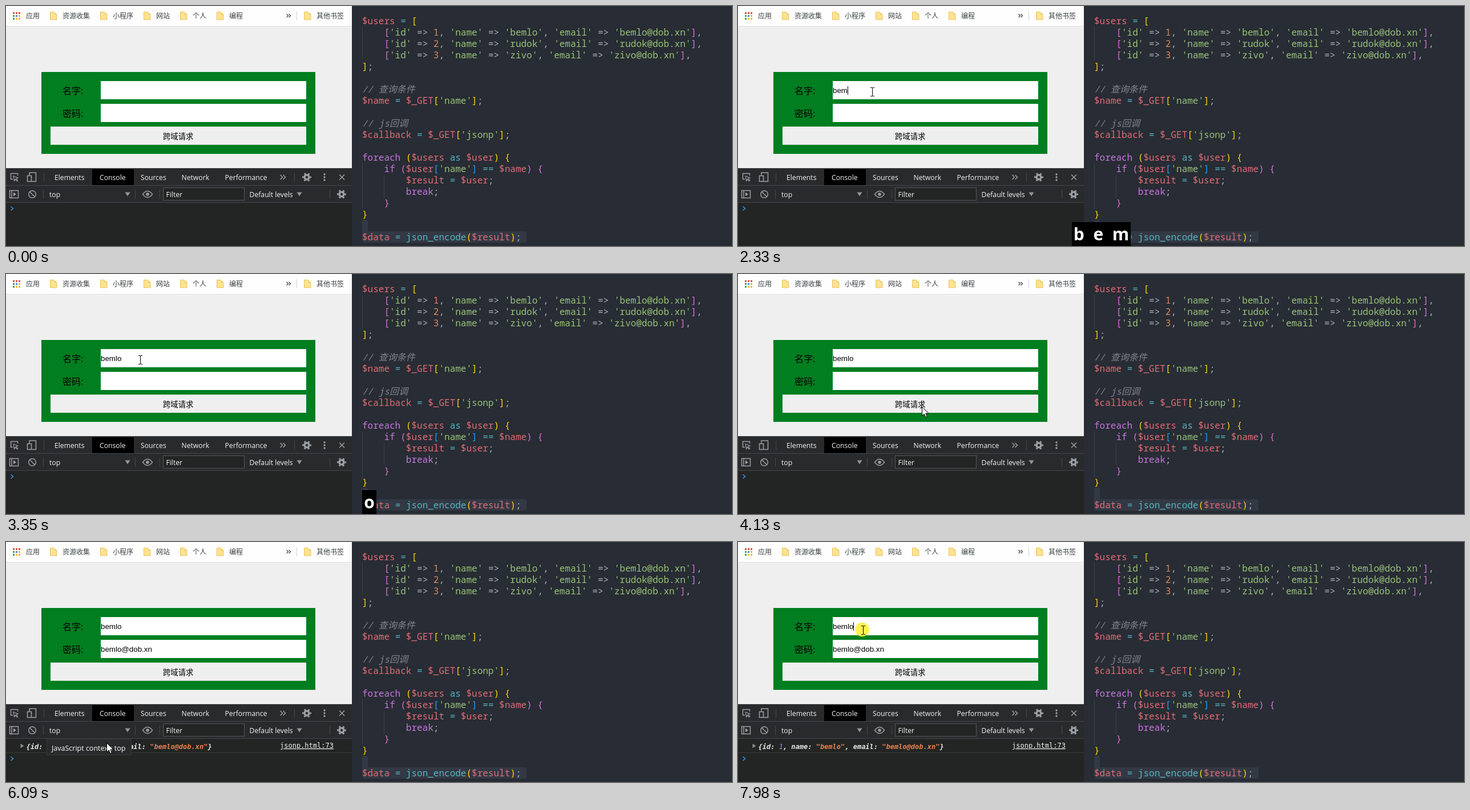
Animation, 1272 px wide and 422 px high, one loop 8000 ms. Source, as an HTML page:

```html
<!DOCTYPE html>
<html lang="zh-CN">
<head>
<meta charset="utf-8">
<title>JSONP</title>
<style>
html, body { margin: 0; width: 100%; height: 100%; overflow: hidden; background: #282c34; }
svg { display: block; }
text { white-space: pre; }
.cjk { font-family: "Noto Sans CJK SC", "Noto Sans CJK", sans-serif; }
.bar { font-size: 12px; fill: #3c4043; }
.form { font-size: 16px; fill: #000; }
.field { font: 13.333px "Liberation Sans", Arial, sans-serif; fill: #000; }
.ui { font: 12.2px "Open Sans", sans-serif; fill: #f4f4f4; }
.tip { font: 12.5px "Open Sans", sans-serif; fill: #fff; }
.log { font: italic bold 12px "DejaVu Sans Mono", monospace; fill: #e8e8e8; }
.link { font: 12px "DejaVu Sans Mono", monospace; fill: #f4f4f4; text-decoration: underline; }
.code { font: 16px "Noto Sans Mono", "Noto Sans CJK SC", monospace; fill: #abb2bf; }
.keys { font: bold 30px "Open Sans", sans-serif; fill: #fff; text-anchor: middle; }
.icon { fill: none; stroke: #9aa0a6; stroke-width: 1.5; }
</style>
</head>
<body>
<svg id="stage" width="1272" height="422" viewBox="0 0 1272 422"></svg>
<script>
const LOOP = 8000;
const USER = 'bemlo', MAIL = USER + '@dob.xn';
const stage = document.getElementById('stage');

function el(tag, attrs, parent = stage, content) {
  const node = document.createElementNS('http://www.w3.org/2000/svg', tag);
  for (const k in attrs) node.setAttribute(k, attrs[k]);
  if (content !== undefined) node.textContent = content;
  parent.appendChild(node);
  return node;
}
const rect = (x, y, width, height, fill, parent, more) =>
  el('rect', { x, y, width, height, fill, ...more }, parent);
const label = (cls, x, y, str, parent, more) =>
  el('text', { class: cls, x, y, ...more }, parent, str);
const icon = (d, more) => el('path', { class: 'icon', d, ...more });
const show = (node, on) => node.setAttribute('visibility', on ? 'visible' : 'hidden');

// Bookmarks bar
function folder(x) {
  el('path', { d: `M${x + .5} 10.5h7l1 2v2h3.5v9.5h-11.5z`, fill: '#ffe391', stroke: '#e8c258' });
  rect(x + 8, 13, 3, 1, '#e8c258');
}
function bookmarks() {
  rect(0, 0, 606, 36, '#fefefe');
  rect(0, 35, 606, 1, '#e2e2e2');
  const dots = ['#e04a3f', '#e04a3f', '#e04a3f', '#3a9d57', '#4285f4', '#f2b50f', '#3a9d57', '#f2b50f', '#f2b50f'];
  dots.forEach((c, i) => rect(12 + i % 3 * 5, 11 + Math.floor(i / 3) * 5, 3, 3, c));
  label('cjk bar', 35, 21.5, '应用');
  [[77, '资源收集'], [165, '小程序'], [241, '网站'], [305, '个人'], [369, '编程'], [522, '其他书签']]
    .forEach(([x, name]) => { folder(x); label('cjk bar', x + 22, 21.5, name); });
  icon('M491.5 14l3 3-3 3M495.5 14l3 3-3 3', { style: 'stroke:#55595e' });
  rect(509, 9, 1, 16, '#d5d7da');
}

function page() {
  rect(0, 36, 606, 249, '#efefef');
  rect(62, 116, 480, 144, '#007e20');
  rect(166, 132, 360, 32, '#fff');
  rect(166, 172, 360, 32, '#fff');
  rect(78, 212, 448, 32, '#efefef');
  label('cjk form', 99, 155, '名字:');
  label('cjk form', 99, 195, '密码:');
  label('cjk', 301.7, 234, '跨域请求', stage, { 'font-size': 13.333, 'text-anchor': 'middle' });
}

// Developer tools
function gear(x, y) {
  el('circle', { class: 'icon', cx: x, cy: y, r: 4, style: 'stroke-width:3.6' });
  el('circle', { class: 'icon', cx: x, cy: y, r: 6.7, style: 'stroke-width:2.6',
    'stroke-dasharray': '3 4.016', 'stroke-dashoffset': 1.5 });
}
function tools() {
  rect(0, 285, 606, 137, '#232424');
  rect(0, 285, 606, 61, '#292a2b');
  rect(0, 285, 606, 1, '#45474a');
  rect(0, 315, 606, 1, '#45474a');
  rect(0, 345, 606, 1, '#45474a');
  rect(151, 287, 73, 28, '#000');
  [[85, 'Elements'], [164, 'Console'], [236, 'Sources'], [307.5, 'Network'], [383.5, 'Performance']]
    .forEach(([x, name]) => label('ui', x, 305.5, name));
  icon('M12 304.5H8.5V294.5H20.5V298');
  icon('M13 299l8 3-3.3 1.5 3 3.5-1.5 1-3-3.5-1.7 3z', { style: 'stroke-width:1.2' });
  icon('M41 298V293H52.5V308.5H45M37.5 298.5h7v10h-7z');
  icon('M480.5 297l4 4-4 4M485.5 297l4 4-4 4');
  gear(527, 301);
  [296, 301, 306].forEach(cy => el('circle', { cx: 558, cy, r: 1.7, fill: '#9aa0a6' }));
  icon('M584 296.5l9 9M593 296.5l-9 9');
  icon('M6.5 324.5h15v13h-15zM10 324.5v13');
  el('path', { d: 'M13 327.5l5 3.5-5 3.5z', fill: '#9aa0a6' });
  icon('M41.5 326.5l9 9M52.3 331a6.3 6.3 0 1 1-12.6 0a6.3 6.3 0 1 1 12.6 0z');
  label('ui', 76, 335.5, 'top');
  label('ui', 426.5, 335.5, 'Default levels');
  [[213, 331], [514, 331]].forEach(([x, y]) =>
    el('path', { d: `M${x - 4.5} ${y - 3.5}h9l-4.5 7z`, fill: '#8f9499' }));
  icon('M239.5 331q8.5-11 17 0q-8.5 11-17 0z');
  el('circle', { cx: 248, cy: 331, r: 2.8, fill: '#9aa0a6' });
  [[66, 293], [505, 293], [65, 323], [226, 323], [269, 323], [567, 323]]
    .forEach(([x, y]) => rect(x, y, 1, 16, '#45474a'));
  rect(275.5, 319.5, 142, 22, '#232424', stage, { stroke: '#55585b' });
  label('ui', 280.5, 336, 'Filter');
  gear(588, 331);
}

// Editor: colours follow token kind, brackets follow nesting depth
const RED = '#e06c75', CYAN = '#56b6c2', GREEN = '#98c379', PURPLE = '#c678dd';
const BRACKETS = ['#ffd700', '#da70d6', '#179fff'];
const row = (id, name) => `    ['id' => ${id}, 'name' => '${name}', 'email' => '${name}@dob.xn'],`;
const CODE = [
  '$users = [', row(1, USER), row(2, 'rudok'), row(3, 'zivo'), '];', '',
  '// 查询条件', "$name = $_GET['name'];", '',
  '// js回调', "$callback = $_GET['jsonp'];", '',
  'foreach ($users as $user) {',
  "    if ($user['name'] == $name) {",
  '        $result = $user;', '        break;', '    }', '}', '',
  '$data = json_encode($result);'
];
function editor() {
  rect(606, 0, 666, 422, '#282c34');
  rect(624, 376, 10, 24, '#323944', stage, { rx: 3 });
  rect(624, 396, 288, 20, '#323944', stage, { rx: 3 });
  [[624, 37, 60], [624, 277, 80], [662, 297, 40]].forEach(([x, y, h]) => rect(x, y, 1, h, '#3b4048'));
  let depth = 0;
  const colour = s => {
    if (/^[\[({]$/.test(s)) return BRACKETS[depth++ % 3];
    if (/^[\])}]$/.test(s)) return BRACKETS[--depth % 3];
    if (s[0] === '$') return RED;
    if (s[0] === "'") return GREEN;
    if (/^\d/.test(s)) return '#d9895f';
    if (/^(foreach|if|break)$/.test(s)) return PURPLE;
    if (/^(as|json_encode|==?)$/.test(s)) return CYAN;
    return '#abb2bf';
  };
  CODE.forEach((line, i) => {
    const text = label('code', 624, 32 + 20 * i, '');
    if (line.startsWith('//')) {
      el('tspan', { fill: '#7f848e', 'font-style': 'italic' }, text, line);
      return;
    }
    for (const s of line.match(/\$\w+|'[^']*'|\w+|=>|==|\s+|./g) || [])
      el('tspan', { fill: colour(s) }, text, s);
  });
}

bookmarks();
page();
tools();
editor();

// Changing parts
const nameText = label('field', 166, 153, '');
const mailText = label('field', 166, 193, MAIL);
const caret = rect(166, 141, 1, 15, '#000');

const log = el('g', {});
el('path', { d: 'M25.5 354.5l6 4-6 4z', fill: '#85898d' }, log);
const entry = label('log', 35.5, 363.5, '', log);
[['{id: '], ['1', '#9a8fd0', 'normal'], [', name: '], [`"${USER}"`, '#e8834f'],
 [', email: '], [`"${MAIL}"`, '#e8834f'], ['}']]
  .forEach(([s, fill = '#e8e8e8', weight = 'bold']) =>
    el('tspan', { fill, 'font-weight': weight }, entry, s));
label('link', 480, 362, 'jsonp.html:73', log);
rect(0, 370, 606, 1, '#3a3b3c', log);
const prompt = el('path', { d: 'M8.5 352.5l4 3.5-4 3.5', fill: 'none', stroke: '#3b93e0', 'stroke-width': 1.6 });

const tip = el('g', {});
rect(71.5, 347.5, 148, 27, '#292a2b', tip, { stroke: '#37393b' });
label('tip', 80, 366.5, 'JavaScript context: top', tip);

const keyBox = rect(0, 380, 0, 42, '#000');
const keyText = label('keys', 636.5, 412, '');

const halo = el('circle', { cx: 0, cy: 0, r: 12.5, fill: '#ffee2e', opacity: .82 });
const arrow = el('path', { d: 'M.5 .5v16l3.7-3.5 2.5 5.6 2.6-1.1-2.5-5.5h5.2z', fill: '#fff', stroke: '#000' });
const beam = el('path', { d: 'M-3.5 -7.5h3l.5 .5 .5-.5h3M0 -7v14M-3.5 7.5h3l.5-.5 .5 .5h3', fill: 'none' });

// Key strokes: time shown, time gone
const KEYS = [[2010, 2940], [2160, 3110], [2330, 3260], [2410, 3350], [2480, 3440]];
const CARET = [[1090, 1630], [2010, 3010], [3530, 4130], [7980, 8000]];
const CLICKS = [[1090, 1170], [4590, 4660], [7980, 8000]];
const RESULT = 4660;

// Pointer moves: first step, last step, step count, path
const MOVES = [
  [70, 840, 11, [[697, 374], [470, 335], [300, 288], [225, 243], [192, 180], [233, 153]]],
  [920, 920, 1, [[233, 153], [235, 151]]],
  [3510, 3730, 4, [[235, 151], [282, 195], [322, 233]]],
  [4360, 4360, 1, [[322, 233], [320, 233]]],
  [5750, 6500, 10, [[320, 233], [255, 288], [176, 353], [95, 371], [29, 366]]],
  [6570, 6640, 2, [[29, 366], [24, 363]]],
  [6820, 7580, 11, [[24, 363], [60, 368], [160, 340], [260, 282], [316, 236], [287, 196], [250, 167]]],
  [7650, 7760, 2, [[250, 167], [239, 154]]],
  [7900, 7980, 2, [[239, 154], [219, 155]]]
];

const within = (spans, t) => spans.some(([a, b]) => t >= a && t < b);

function along(path, u) {
  const p = u * (path.length - 1), i = Math.min(Math.floor(p), path.length - 2);
  return [0, 1].map(k => path[i][k] + (path[i + 1][k] - path[i][k]) * (p - i));
}
function pointer(t) {
  const move = MOVES.filter(m => t >= m[0]).pop();
  if (!move) return null;
  const [from, to, n, path] = move;
  const gap = n > 1 ? (to - from) / (n - 1) : 1;
  const step = Math.min(n - 1, Math.floor((t - from) / gap + 1e-6));
  return along(path, (step + 1) / n).map(Math.round);
}
function overText(x, y) {
  const inField = x >= 166 && x < 526 && ((y >= 132 && y < 164) || (y >= 172 && y < 204));
  return inField || x > 606;
}

function draw(t) {
  nameText.textContent = USER.slice(0, KEYS.filter(k => t >= k[0]).length);
  caret.setAttribute('x', 166 + Math.round(nameText.getComputedTextLength()));
  show(caret, within(CARET, t));

  const done = t >= RESULT;
  show(mailText, done);
  show(log, done);
  prompt.setAttribute('transform', `translate(0 ${done ? 25 : 0})`);
  show(tip, t >= 6000 && t < 6250);

  const held = [...USER].filter((c, i) => within([KEYS[i]], t)).join('  ');
  keyText.textContent = held;
  const width = held ? Math.round(keyText.getComputedTextLength()) + 6 : 0;
  keyBox.setAttribute('width', width);
  keyBox.setAttribute('x', 636.5 - width / 2);

  const at = pointer(t);
  const text = at && overText(...at);
  show(arrow, at && !text);
  show(beam, text);
  show(halo, at && within(CLICKS, t));
  if (!at) return;
  const [x, y] = at;
  arrow.setAttribute('transform', `translate(${x} ${y})`);
  beam.setAttribute('transform', `translate(${x + .5} ${y})`);
  beam.setAttribute('stroke', x > 606 ? '#fff' : '#000');
  halo.setAttribute('transform', `translate(${x - 1.5} ${y - 1})`);
}

const start = performance.now();
function tick() {
  draw((performance.now() - start) % LOOP);
  requestAnimationFrame(tick);
}
tick();
</script>
</body>
</html>
```
